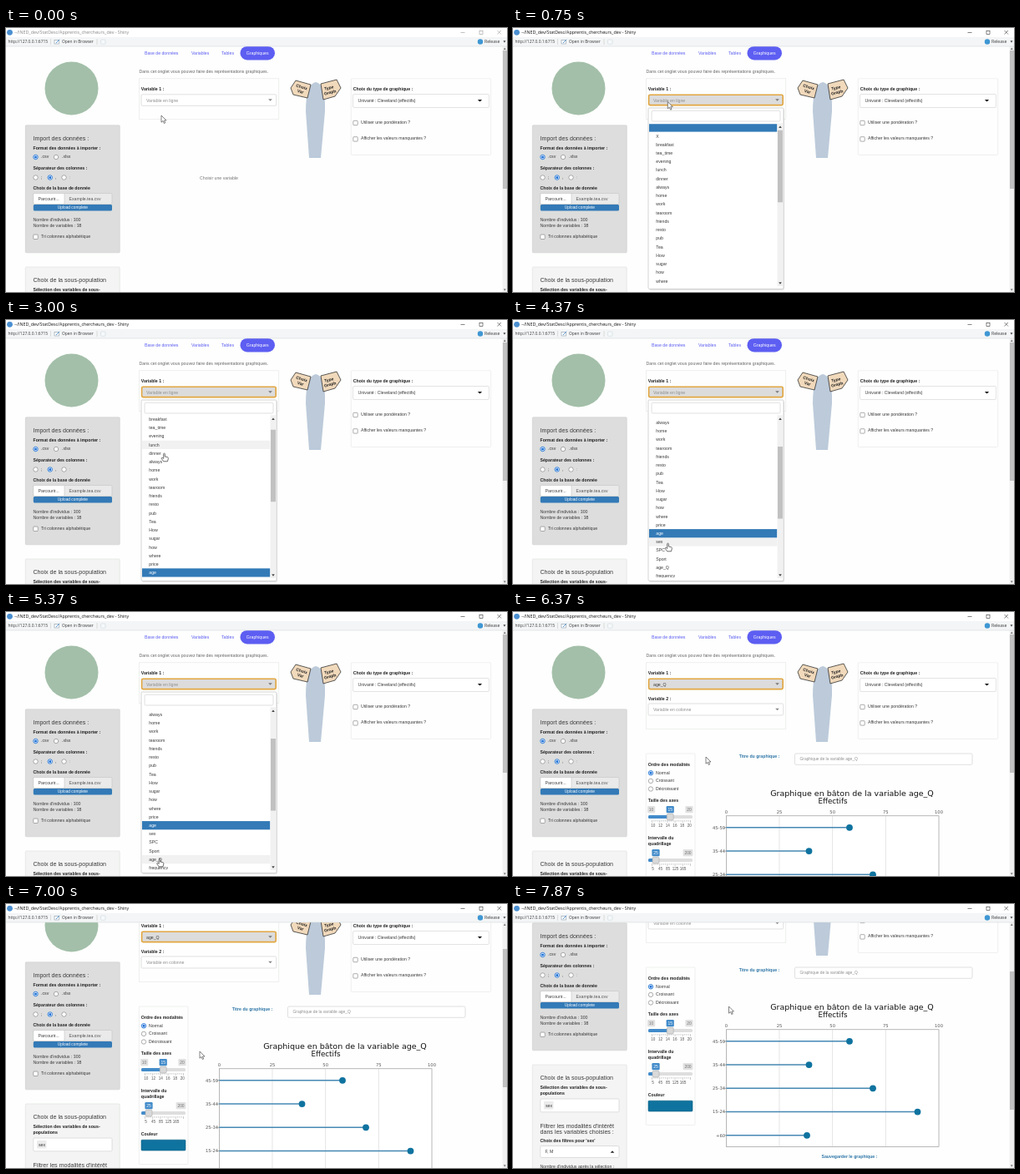
These frames come from a looping animation (600 by 317 pixels, 8 s). An HTML page:

```html
<!DOCTYPE html>
<html lang="fr">
<head>
<meta charset="utf-8">
<title>Shiny</title>
<style>
html, body { margin: 0; width: 100%; height: 100%; overflow: hidden; background: #fdfefd; }
svg { display: block; width: 600px; height: 317px; }
text { font-family: "Liberation Sans", Arial, sans-serif; white-space: pre; }
.ui { font-family: "Open Sans", sans-serif; }
.plot { font-family: "DejaVu Sans", Verdana, sans-serif; }
.b { font-weight: bold; }
</style>
</head>
<body>
<svg id="stage" viewBox="0 0 600 317" xmlns="http://www.w3.org/2000/svg"></svg>
<script>
const INK = '#3a3a3a', GREY = '#8f8f8f', BLUE = '#337ab7', TEAL = '#0f739f', VIOLET = '#5d5ef2';

// Shape helpers; text is placed by its vertical centre.
const text = (x, y, s, { size = 5.2, fill = INK, cls = '', anchor = 'start', more = '' } = {}) =>
  `<text x="${x}" y="${y + size * 0.35}" font-size="${size}" fill="${fill}" class="${cls}" text-anchor="${anchor}" ${more}>${s}</text>`;
const bold = (x, y, s, o = {}) => text(x, y, s, { fill: '#222', cls: 'b', ...o });
const mid = (x, y, s, o = {}) => text(x, y, s, { anchor: 'middle', ...o });
const box = (x1, y1, x2, y2, fill, stroke = 'none', r = 0, w = 0.6) =>
  `<rect x="${x1}" y="${y1}" width="${x2 - x1}" height="${y2 - y1}" rx="${r}" fill="${fill}" stroke="${stroke}" stroke-width="${w}"/>`;
const line = (x1, y1, x2, y2, stroke, w = 0.6) =>
  `<path d="M${x1} ${y1}L${x2} ${y2}" stroke="${stroke}" stroke-width="${w}" fill="none"/>`;
const disc = (x, y, r, fill, stroke = 'none', w = 0.7) =>
  `<circle cx="${x}" cy="${y}" r="${r}" fill="${fill}" stroke="${stroke}" stroke-width="${w}"/>`;
const caret = (x, y, fill, up = 1, w = 2.3) =>
  `<path d="M${x - w} ${y - up * 1.2}h${2 * w}l${-w} ${up * 2.5}z" fill="${fill}"/>`;
const radio = (x, y, on) => on
  ? disc(x, y, 2.7, '#fff', '#1a6fd6', 0.9) + disc(x, y, 1.5, '#1a6fd6')
  : disc(x, y, 2.7, '#fff', '#777', 0.6);
const check = (x, y) => box(x, y - 2.7, x + 5.4, y + 2.7, '#fff', '#777', 0.8);
const group = (id, body, more = '') => `<g id="${id}" ${more}>${body}</g>`;

const titleBar = () =>
  box(0, 0, 600, 11, '#fff') + box(0, 11, 600, 22, '#f3f5f6') + line(0, 22, 600, 22, '#d5d8da') +
  disc(4.5, 5.3, 3.4, '#4a8fd0') +
  group('caption', text(10, 5.4, '~/INED_dev/StatDesc/Apprentis_chercheurs_dev - Shiny', { size: 5.33, cls: 'ui', fill: '#111' }) +
    line(544.5, 5.5, 549.5, 5.5, '#333') + box(567, 3.3, 571, 7.3, 'none', '#333') +
    line(588.5, 3, 593, 7.5, '#333') + line(593, 3, 588.5, 7.5, '#333')) +
  text(2.5, 16.5, 'http://127.0.0.1:6715', { size: 4.9, cls: 'ui' }) +
  line(53.5, 13, 53.5, 20, '#ccc') + line(109, 13, 109, 20, '#ccc') +
  box(58, 14.5, 63.5, 19, '#fff', '#8a9bab') + line(60, 18, 64, 13.8, '#4a8fd0', 0.9) +
  text(67, 16.5, 'Open in Browser', { size: 4.85, cls: 'ui' }) +
  box(113.5, 14, 119, 19.3, '#f6f8f9', '#cfd8df', 1) +
  disc(568, 16.5, 3.2, '#3f97d3') +
  text(573, 16.5, 'Release', { size: 5.1, cls: 'ui' }) + caret(597, 16.5, '#444', 1, 1.5);

const tabs = () =>
  text(166, 30, 'Base de données', { fill: VIOLET }) + text(222, 30, 'Variables', { fill: VIOLET }) +
  text(258, 30, 'Tables', { fill: VIOLET }) + box(280.5, 21.9, 322, 38.5, VIOLET, 'none', 8.3) +
  mid(301.2, 30.2, 'Graphiques', { fill: '#fff' }) +
  text(159.5, 51.8, 'Dans cet onglet vous pouvez faire des représentations graphiques.', { size: 5.23, fill: '#666' });

const importPanel = () =>
  disc(78.5, 72.5, 32, '#a3bfa9') +
  box(23.3, 116.8, 136.2, 269.8, '#dcdddc', '#cbcccb', 1) +
  text(32.5, 132.3, 'Import des données :', { size: 7.1 }) +
  bold(32.5, 144, 'Format des données à importer :') +
  radio(35.5, 155, true) + text(42, 154.5, '.csv') + radio(60, 155) + text(67, 154.5, '.xlsx') +
  bold(32.5, 168.3, 'Séparateur des colonnes :') +
  radio(35.5, 179.5) + text(42, 179, ';') + radio(52.8, 179.5, true) + text(59, 179, ',') +
  radio(69.5, 179.5) + text(76, 179, ':', { fill: GREY }) +
  bold(32.5, 192, 'Choix de la base de donnée') +
  box(32.8, 198.5, 127, 211.5, '#e9eae9', '#c4c4c4', 1.5) + box(32.8, 198.5, 70, 211.5, '#fff', '#c4c4c4', 1.5) +
  text(38.5, 205.3, 'Parcourir...') + text(75.5, 205.3, 'Example.tea.csv', { fill: '#555' }) +
  box(32.8, 212, 127, 219.5, BLUE, 'none', 1.5) + mid(79.8, 215.8, 'Upload complete', { size: 4.8, fill: '#fff' }) +
  text(32.5, 230, "Nombre d'individus : 300") + text(32.5, 237.3, 'Nombre de variables : 38') +
  check(32.8, 250.8) + text(42, 249.8, 'Tri colonnes alphabétique');

const subsetPanel = () =>
  box(23.3, 287, 136.2, 480, '#f3f4f3', '#dcdddc', 1) +
  text(32.5, 303, 'Choix de la sous-population', { size: 7.1 }) +
  bold(32.5, 314.5, 'Sélection des variables de sous-') + bold(32.5, 321.6, 'populations') +
  box(32.8, 328, 127, 343.8, '#fff', '#ccc', 1.5) + box(37, 331, 48.5, 340.5, '#ebebeb', 'none', 1) +
  text(39, 335.8, 'sex') +
  text(32.5, 360.5, "Filtrer les modalités d'intérêt", { size: 7.1 }) +
  text(32.5, 368, 'dans les variables choisies :', { size: 7.1 }) +
  bold(32.5, 378.3, "Choix des filtres pour 'sex'") +
  box(32.8, 384.5, 127, 398.5, '#fff', '#ccc', 1.5) + text(38.5, 391.5, 'F, M') + caret(119, 391.5, '#222', -1) +
  text(32.5, 409.3, "Nombre d'individus après la sélection :");

const sign = (path, a, x, y, top, bottom) =>
  `<path d="${path}" fill="#f1d9bb" stroke="#333" stroke-width=".8" stroke-linejoin="round"/>` +
  `<g transform="translate(${x} ${y}) rotate(${a})">` +
  [top, bottom].map((s, i) => mid(0, i * 5.6 - 2.8, s, { size: 5, cls: 'b', fill: '#222' })).join('') + '</g>';

const mascot = () =>
  '<path d="M371 65Q383 67 382 100L377 156H363L359 100Q359 67 371 65Z" fill="#bccada"/>' +
  sign('M341 72L347 63L365 68L361 84L344 80Z', 16, 353.5, 73.5, 'Choix', 'Var') +
  sign('M377 67L396 62L401 72L394 82L380 86Z', -14, 387.5, 74.5, 'Type', 'Graph');

const typePanel = () =>
  box(413.3, 60.8, 580.7, 152.5, '#fdfefd', '#e4e6e4', 1) +
  bold(415.8, 73.2, 'Choix du type de graphique :') +
  box(415.5, 79.5, 578.5, 95.5, '#fff', '#d2d2d2', 1.5) + text(421.5, 87.4, 'Univarié : Cleveland (effectifs)') +
  caret(567.5, 87.3, '#111', 1, 2.6) +
  check(415.8, 114) + text(425, 113, 'Utiliser une pondération ?') +
  check(415.8, 133.4) + text(425, 132.5, 'Afficher les valeurs manquantes ?');

const variablePanel = () =>
  `<rect id="varPanel" x="159.3" y="60.8" width="167.5" height="48.5" fill="#fdfefd" stroke="#e4e6e4" stroke-width=".6"/>` +
  bold(161.8, 73.2, 'Variable 1 :') +
  group('idle', box(162, 79.8, 323.7, 93.3, '#fff', '#ccc', 1.5) + caret(316.5, 86.5, '#888')) +
  group('focus', box(162.6, 80.3, 323.2, 92.6, '#dcdcdc', '#e2a640', 1.5, 1.6) + caret(316.5, 86.5, '#777')) +
  `<text id="varText" x="168" y="88.5" font-size="5.2"></text>`;

const slider = (y, at, lo, now, hi, nums, x0, step) => {
  const tag = (x, s, on) => box(x - 4.6 - (s.length - 2) * 1.3, y - 13, x + 4.6 + (s.length - 2) * 1.3, y - 4.8,
    on ? '#428bca' : '#e1e1e1', 'none', 1.2) + mid(x, y - 8.9, s, { size: 4.9, fill: on ? '#fff' : '#777' });
  const ticks = Array.from({ length: 21 }, (_, i) => {
    const x = 166.5 + i * 2.3;
    return line(x, y + 4, x, y + (i % 4 ? 5.6 : 7), '#999', 0.5);
  }).join('');
  return box(162, y - 1.9, 215, y + 1.9, '#dedede', 'none', 1.5) + box(162, y - 1.9, at, y + 1.9, '#428bca', 'none', 1.5) +
    ticks + (lo ? tag(165.6, lo) : '') + tag(hi.length > 2 ? 209.5 : 211, hi) + tag(at, now, true) +
    box(at - 4, y - 3.8, at + 4, y + 4, '#d9d9d9', '#aaa', 1.5) +
    nums.map((n, i) => mid(x0 + i * step, y + 10.3, n, { size: 4.6, fill: '#555' })).join('');
};

const options = () =>
  box(159.3, 170, 218, 359.5, '#fdfefd', '#e4e6e4', 1) +
  bold(161.8, 183, 'Ordre des modalités') +
  ['Normal', 'Croissant', 'Décroissant'].map((s, i) =>
    radio(165, 193.3 + i * 9.6, i === 0) + text(171, 192.7 + i * 9.6, s)).join('') +
  bold(161.8, 226.5, 'Taille des axes') +
  slider(246, 188.2, '10', '15', '20', [10, 12, 14, 16, 18, 20], 167.8, 8.7) +
  bold(161.8, 271, 'Intervalle du') + bold(161.8, 278.5, 'quadrillage') +
  slider(298, 171, '', '25', '200', [5, 45, 85, 125, 165], 167.5, 9) +
  bold(161.8, 323.5, 'Couleur') + box(162, 330.2, 215, 343, TEAL, '#0c5f85', 1);

const chart = () => {
  const rows = [['45-59', 403], ['35-44', 354.5], ['25-34', 431], ['15-24', 484.5], ['+60', 352]];
  const plot = (x, y, s, size, o = {}) => mid(x, y, s, { size, cls: 'plot', fill: '#111', ...o });
  let out = box(255.3, 244.8, 510, 385.3, '#fff', '#888') +
    plot(406, 217.8, 'Graphique en bâton de la variable age_Q', 9.5) + plot(383, 227, 'Effectifs', 8.7);
  for (let i = 0; i < 5; i++) {
    const x = 255.3 + i * 63.68;
    if (i % 4) out += line(x, 245, x, 385, '#d2d2d2');
    out += plot(x, 240.6, i * 25, 5.2, { fill: '#555' });
  }
  rows.forEach(([name, x], i) => {
    const y = 258.8 + i * 28.25;
    out += line(255.3, y, x, y, '#4688b3', 1.6) + disc(x, y, 3.9, TEAL) +
      line(253, y, 255, y, '#777') + plot(254, y, name, 5.2, { anchor: 'end', fill: '#555' });
  });
  return out;
};

const result = () =>
  bold(161.8, 104, 'Variable 2 :') + box(162, 110, 323.7, 124, '#fff', '#ccc', 1.5) +
  text(168, 117.3, 'Variable en colonne', { fill: GREY }) + caret(316.5, 117, '#888') + options() +
  bold(270.8, 173.3, 'Titre du graphique :', { fill: '#2f76a8' }) +
  box(337.5, 170, 550, 183.3, '#fff', '#ccc', 1.5) + text(343.5, 176.6, 'Graphique de la variable age_Q', { size: 4.9, fill: GREY }) +
  chart() + bold(369.5, 397, 'Sauvegarder le graphique :', { fill: '#2f76a8' });

// Variable list
const items = (' X breakfast tea_time evening lunch dinner always home work tearoom friends resto pub Tea How sugar how where ' +
  'price age sex SPC Sport age_Q frequency escape.exoticism spirituality healthy diuretic friendliness ' +
  'iron.absorption feminine sophisticated slimming exciting relaxing effect.on.health').split(' ');
const ROW = 10.235, rowY = i => 119.5 + i * ROW;
const rowBox = (id, fill) => `<rect id="${id}" x="163" width="153.3" height="${ROW}" fill="${fill}"/>`;

const menu = () =>
  box(163, 97, 325, 315, '#00000018', 'none', 2) + box(162, 96, 324, 313.3, '#fff', '#bbb', 1.5) +
  box(166, 99.3, 320, 112, '#fff', '#ccc', 1.5) +
  `<g clip-path="url(#listClip)">` + group('list', rowBox('hover', '#f1f1f1') + rowBox('active', BLUE) +
    items.map((s, i) => text(171.3, rowY(i), s, { more: 'data-item' })).join('')) + '</g>' +
  box(316.5, 114.3, 323.3, 310, '#f1f1f1') + caret(320, 118.7, '#444', -1, 1.8) + caret(320, 306.5, '#444', 1, 1.8) +
  `<rect id="listThumb" x="317" width="6" height="86.5" fill="#c1c1c1"/>`;

const arrow = '<path d="M0 0V8.2L2 6.5L3.3 9.5L4.7 8.9L3.4 6H6Z" fill="#fff" stroke="#333" stroke-width=".6"/>';
const hand = '<path d="M-.8 .6Q0 -.4 .8 .6V4L4 4.6Q5 5 4.8 6.5L4 9.8H-.8L-3.4 6.2Q-3 4.8 -1.8 5.6L-.8 6.4Z" fill="#fff" stroke="#333" stroke-width=".7"/>';

const $ = id => document.getElementById(id);
$('stage').innerHTML =
  '<defs><clipPath id="listClip"><rect x="162" y="115.2" width="155" height="194"/></clipPath></defs>' +
  box(0, 0, 600, 317, '#fdfefd') +
  group('page', tabs() + importPanel() + subsetPanel() + variablePanel() + mascot() + typePanel() +
    group('hint', text(232, 180.3, 'Choisir une variable', { fill: '#777' })) + group('result', result()) + group('menu', menu())) +
  box(594.5, 22, 600, 317, '#f1f1f1') + caret(597.3, 24.7, '#777', -1, 1.4) + caret(597.3, 314.5, '#777', 1, 1.4) +
  '<rect id="pageThumb" x="595" width="5" height="166" fill="#c1c1c1"/>' +
  titleBar() + group('cursor', group('arrow', arrow) + group('hand', hand));
const labels = document.querySelectorAll('[data-item]');

// Motion tables: time, then values
const OPEN = 620, PICK = 2250, CLOSE = 5480, SHOW = 5740, LOOP = 8000, STEP = 125;
const cursorKeys = [[0, 186, 105], [150, 186, 105], [500, 186, 88], [900, 185, 89], [1500, 183.5, 115], [2100, 183.5, 117],
  [2600, 187, 130], [3000, 189.5, 160], [3500, 186, 262], [4370, 185.5, 268], [4600, 185.5, 269], [5000, 184, 296],
  [5500, 184, 296], [6200, 231, 174], [6500, 231, 174], [7000, 232, 177], [7250, 233, 176], [7750, 258.5, 123], [8000, 258.5, 123]];
const listKeys = [[0, 0], [2200, 0], [2250, 20.8], [3560, 20.8], [4250, 68], [8000, 68]];
const pageKeys = [[0, 0], [6500, 0], [6900, 47], [7150, 47], [7650, 94], [8000, 94]];

function at(keys, t) {
  const i = Math.max(1, keys.findIndex(k => k[0] >= t));
  const a = keys[i - 1], b = keys[i];
  const u = Math.max(0, (t - a[0]) / (b[0] - a[0]));
  const e = u * u * (3 - 2 * u);
  return a.slice(1).map((v, j) => v + (b[j + 1] - v) * e);
}
const show = (id, on) => $(id).setAttribute('display', on ? 'inline' : 'none');
const move = (id, x, y) => $(id).setAttribute('transform', `translate(${x} ${y})`);
const set = (id, name, v) => $(id).setAttribute(name, v);

function draw(t) {
  const open = t >= OPEN && t < CLOSE, done = t >= SHOW, chosen = t >= CLOSE;
  const [scroll] = at(listKeys, t), [top] = at(pageKeys, t), [x, y] = at(cursorKeys, t);

  // The window gains focus with the first click.
  set('caption', 'opacity', t < OPEN ? 0.5 : 1);
  show('idle', t < OPEN); show('focus', t >= OPEN);
  show('menu', open); show('hint', !done); show('result', done);
  set('varPanel', 'height', done ? 79.5 : 48.5);
  $('varText').textContent = chosen ? 'age_Q' : 'Variable en ligne';
  set('varText', 'fill', chosen ? INK : GREY);

  const active = t < PICK ? 0 : 20;
  const lagY = at(cursorKeys, Math.max(0, t - STEP))[1];
  const over = Math.round((lagY + scroll - rowY(0)) / ROW);
  set('active', 'y', rowY(active) - ROW / 2);
  set('hover', 'y', rowY(Math.max(0, over)) - ROW / 2);
  show('hover', lagY > 115);
  labels.forEach((el, i) => el.setAttribute('fill', i === active ? '#fff' : INK));
  move('list', 0, -scroll);
  set('listThumb', 'y', 122.8 + scroll * 0.43);

  move('page', 0, -top);
  set('pageThumb', 'y', 27 + top * 0.575);
  move('cursor', x, y);
  const pointing = open && y > 113;
  show('hand', pointing); show('arrow', !pointing);
}

const start = performance.now();
function frame() {
  const t = (performance.now() - start) % LOOP;
  draw(Math.min(LOOP - STEP, Math.floor((t + 6) / STEP) * STEP));
  requestAnimationFrame(frame);
}
frame();
</script>
</body>
</html>
```
